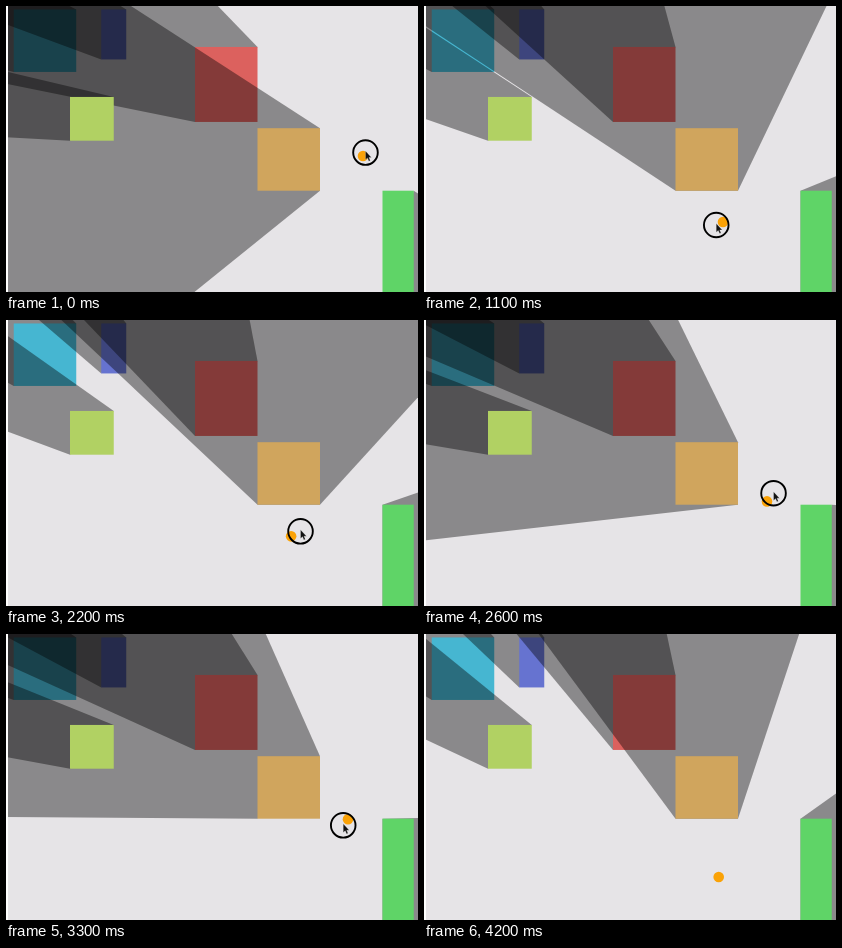
Recreate the animation shown at these times as an HTML page. Size 412 px wide and 286 px high, loop 4.6 s.

```html
<!DOCTYPE html>
<html lang="en">
<head>
<meta charset="utf-8">
<title>Box shadows</title>
<style>
  html, body { margin: 0; width: 100%; height: 100%; overflow: hidden; background: #fff; }
  svg { display: block; width: 412px; height: 286px; }
</style>
</head>
<body>
<svg viewBox="0 0 412 286" xmlns="http://www.w3.org/2000/svg">
  <rect x="2" width="410" height="286" fill="#e6e4e7"/>
  <g id="scene"></g>
  <rect width="2" height="286" fill="#fff"/>
  <circle id="light" r="5.3" fill="#faa207"/>
  <g id="pointer">
    <circle r="12.3" fill="none" stroke="#000" stroke-width="1.9"/>
    <path d="M0-1.5V7.2L2 5.4 3.4 8.6 4.8 8 3.5 4.9H6Z" fill="#111" stroke="#fff" stroke-opacity=".5" stroke-width=".5"/>
  </g>
</svg>
<script>
const LOOP = 4600, STEP = 100;
const LEAD = 60;      // the light trails the pointer by this many ms
const RELEASE = 3800; // the light stays put while the pointer leaves
const FAR = 5000;

// Boxes sit on a round-numbered grid that is scaled to the stage
const SCALE = 0.625, LEFT = 1.5, TOP = -2.8;
const boxes = [
  [10, 10, 100, 100, '#46b6d1'],
  [150, 10, 40, 80, '#6673d0'],
  [300, 70, 100, 120, '#dc615e'],
  [400, 200, 100, 100, '#d0a55d'],
  [100, 150, 70, 70, '#b1d163'],
  [600, 300, 50, 200, '#5fd467']
].map(([x, y, w, h, fill]) => ({
  x: LEFT + x * SCALE, y: TOP + y * SCALE,
  width: w * SCALE, height: h * SCALE, fill
}));

// Turning points of the hand's sweep: time, x, y
const path = [
  [0, 357, 150],
  [150, 362, 143],
  [700, 339.5, 193],
  [1100, 299, 216],
  [1700, 236.5, 240.6],
  [2600, 343, 181.4],
  [2850, 362, 145],
  [3300, 342, 185.3],
  [RELEASE, 294.7, 243],
  [4100, 292, 320]
];

const scene = document.getElementById('scene');
const light = document.getElementById('light');
const pointer = document.getElementById('pointer');

function add(tag, attrs) {
  const el = document.createElementNS('http://www.w3.org/2000/svg', tag);
  for (const name in attrs) el.setAttribute(name, attrs[name]);
  return scene.appendChild(el);
}

const shadows = boxes.map(box => {
  const shadow = add('path', { fill: '#000', 'fill-opacity': 0.4 });
  add('rect', box);
  return shadow;
});

// Speed at a point of the path, zero where the value turns round
function speed(i, axis) {
  const a = path[i - 1] || path[i], b = path[i], c = path[i + 1] || path[i];
  const turns = (b[axis] - a[axis]) * (c[axis] - b[axis]) < 0;
  return turns ? 0 : (c[axis] - a[axis]) / (c[0] - a[0]);
}

// Smooth curve through the path
function positionAt(time) {
  const end = path.length - 1;
  const t = Math.min(time, path[end][0]);
  const next = Math.max(1, path.findIndex(p => p[0] >= t));
  const a = path[next - 1], b = path[next], span = b[0] - a[0];
  const u = (t - a[0]) / span, v = 1 - u;
  return [1, 2].map(axis =>
    v * v * (1 + 2 * u) * a[axis] + u * u * (3 - 2 * u) * b[axis]
    + span * u * v * (v * speed(next - 1, axis) - u * speed(next, axis)));
}

// Wedge behind a box, bounded by its two outermost corners
function shadowPath({ x, y, width: w, height: h }, lx, ly) {
  const cx = x + w / 2 - lx, cy = y + h / 2 - ly;
  const corners = [[x, y], [x + w, y], [x + w, y + h], [x, y + h]].map(([px, py]) => {
    const dx = px - lx, dy = py - ly;
    const turn = Math.atan2(cx * dy - cy * dx, cx * dx + cy * dy);
    const k = FAR / Math.hypot(dx, dy);
    return { turn, near: [px, py], far: [lx + dx * k, ly + dy * k] };
  }).sort((a, b) => a.turn - b.turn);
  const a = corners[0], b = corners[3];
  return 'M' + [a.near, a.far, b.far, b.near].map(p => p.join(' ')).join('L') + 'Z';
}

function draw(time) {
  const t = Math.floor((time % LOOP) / STEP) * STEP;
  const [lx, ly] = positionAt(Math.min(t, RELEASE));
  boxes.forEach((box, i) => shadows[i].setAttribute('d', shadowPath(box, lx, ly)));
  light.setAttribute('cx', lx);
  light.setAttribute('cy', ly);
  pointer.setAttribute('transform', `translate(${positionAt(t + LEAD).join(' ')})`);
}

const start = performance.now();
function tick() {
  draw(performance.now() - start);
  requestAnimationFrame(tick);
}
tick();
</script>
</body>
</html>
```
